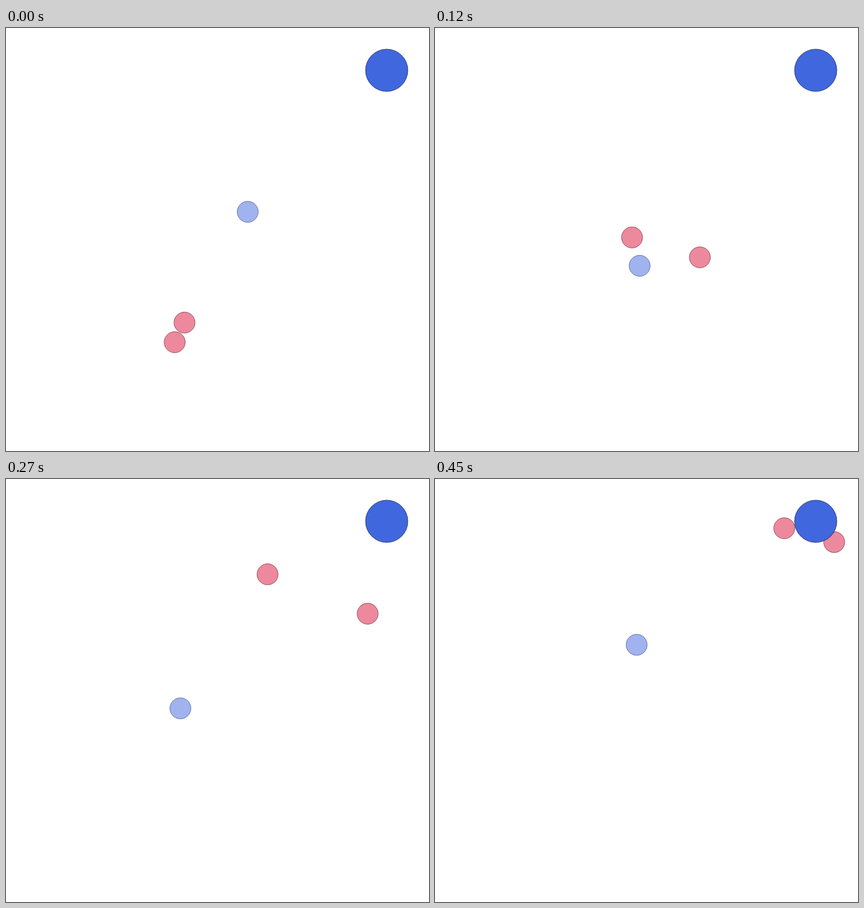
These frames come from a looping animation (700 by 700 pixels, 480 ms). An HTML page with a canvas:

```html
<!DOCTYPE html>
<html lang="en">
<head>
<meta charset="utf-8">
<title>Drifting discs</title>
<style>
  html, body { margin: 0; width: 100%; height: 100%; overflow: hidden; background: #fff; }
  canvas { display: block; width: 700px; height: 700px; }
</style>
</head>
<body>
<canvas id="stage" width="700" height="700"></canvas>
<script>
const ctx = document.getElementById("stage").getContext("2d");
const STEP_MS = 30;
const STEPS = 16;
const LAST = STEPS - 1;
const BRAKE = 11;
const TURN = 5;

const CRIMSON = { fill: "#ed899d", edge: "rgba(90, 10, 30, 0.6)" };
const PALE_BLUE = { fill: "#a0b3ef", edge: "rgba(20, 40, 110, 0.55)" };
const ROYAL = { fill: "#4067de", edge: "rgba(10, 20, 60, 0.7)" };

// Follows a track at constant speed, then eases to a stop at its end.
function cruiser(track, speed) {
  const path = document.createElementNS("http://www.w3.org/2000/svg", "path");
  path.setAttribute("d", track);
  const total = path.getTotalLength();
  const cruised = speed * BRAKE;
  return step => {
    const u = Math.max(0, (step - BRAKE) / (LAST - BRAKE));
    const eased = 1 - (1 - u) ** 2.5;
    const distance = u > 0 ? cruised + (total - cruised) * eased : speed * step;
    return path.getPointAtLength(distance);
  };
}

function bezier(u, a, b, c, d) {
  const v = 1 - u;
  const blend = i => v * v * v * a[i] + 3 * u * v * (v * b[i] + u * c[i]) + u * u * u * d[i];
  return { x: blend(0), y: blend(1) };
}

// Swings down to the turning point, then loops back up.
function swing(step) {
  const turn = [325, 403];
  return step < TURN
    ? bezier(step / TURN, [400, 304.2], [369, 332.5], [348, 398], turn)
    : bezier((step - TURN) / (LAST - TURN), turn, [279, 413], [265.7, 335.2], [333.7, 274.4]);
}

const leader = cruiser(
  "M295.4 487.5 C314.4 446.7 363 437.4 398.8 410 L543 298.8" +
  "C585.3 255 614.1 203.1 629.2 142.5 Q637 111 660.6 104.4", 45.3);
const follower = cruiser(
  "M279.2 520 C315 410 338.2 268.4 370 217.5" +
  "C404.8 161.8 453.9 147.5 512.3 119 L578 81.5", 44.9);

function disc({ x, y }, radius, look) {
  ctx.beginPath();
  ctx.arc(x, y, radius, 0, Math.PI * 2);
  ctx.fillStyle = look.fill;
  ctx.fill();
  ctx.strokeStyle = look.edge;
  ctx.lineWidth = 1;
  ctx.stroke();
}

function draw(now) {
  const step = Math.floor(now / STEP_MS) % STEPS;
  ctx.fillStyle = "#fff";
  ctx.fillRect(0, 0, 700, 700);
  disc(swing(step), 17.4, PALE_BLUE);
  disc(leader(step), 17.4, CRIMSON);
  disc(follower(step), 17.4, CRIMSON);
  disc({ x: 630, y: 70 }, 35, ROYAL);
}

const start = performance.now();
function tick() {
  draw(performance.now() - start);
  requestAnimationFrame(tick);
}
tick();
</script>
</body>
</html>
```
